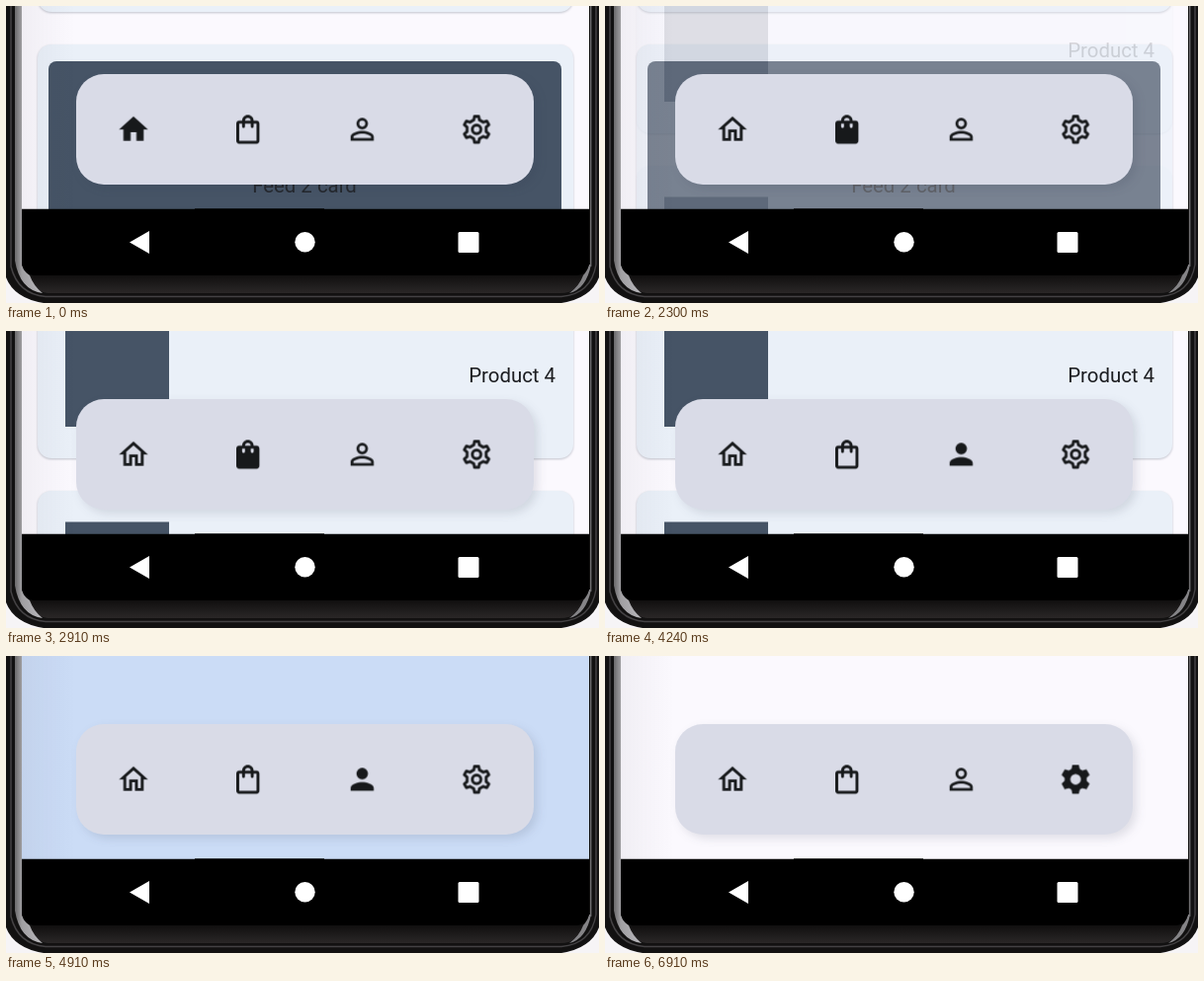
An HTML page for the animation above (7.58 s loop, 600 by 301 pixels).

```html
<!DOCTYPE html>
<html lang="en">
<head>
<meta charset="utf-8">
<title>Bottom navigation</title>
<style>
html, body { margin: 0; width: 100%; height: 100%; overflow: hidden; background: #f6f4f6; }
svg { display: block; width: 100%; height: 100%; }
text { font: 20.4px Roboto, Arial, sans-serif; }
.page, .icon path { animation: 7580ms linear infinite; }
.icon path { animation-timing-function: step-end; }
#feed { animation-name: feed; }
#shop { animation-name: shop; }
#me { animation-name: me; }
.paper { fill: #fbf9fe; }
.card { fill: #eaf0f8; filter: drop-shadow(0 1.5px 1px rgba(60, 70, 90, .3)); }
.tile { fill: #465466; }
.bar { fill: #d9dbe7; filter: drop-shadow(4px 4px 5px rgba(40, 45, 70, .13)); }
@keyframes feed {
  0%, 30.339% { opacity: 1; }
  30.34% { opacity: .84; animation-timing-function: steps(4, end); }
  31.92%, 100% { opacity: 0; }
}
@keyframes shop {
  0%, 30.339% { opacity: 0; }
  30.34% { opacity: .16; animation-timing-function: steps(4, end); }
  31.92% { opacity: 1; }
  55.93% { opacity: 1; animation-timing-function: steps(7, end); }
  58.7%, 100% { opacity: 0; }
}
@keyframes me {
  0% { opacity: 0; }
  55.93% { opacity: 0; animation-timing-function: steps(7, end); }
  58.7% { opacity: 1; }
  83.5% { opacity: 1; animation-timing-function: steps(3, end); }
  84.69%, 100% { opacity: 0; }
}
</style>
</head>
<body>
<svg viewBox="0 0 600 301" preserveAspectRatio="none">
  <defs>
    <linearGradient id="rim">
      <stop offset="0" stop-color="#6a696b"/>
      <stop offset=".25" stop-color="#a09fa2"/>
      <stop offset="1" stop-color="#b9b8bc"/>
    </linearGradient>
    <linearGradient id="chin" x2="0" y2="1">
      <stop offset="0" stop-color="#0c0b0b"/>
      <stop offset="1" stop-color="#2a2727"/>
    </linearGradient>
    <linearGradient id="shade">
      <stop offset="0" stop-color="#302838" stop-opacity=".05"/>
      <stop offset="1" stop-color="#302838" stop-opacity="0"/>
    </linearGradient>
    <clipPath id="screen"><path d="M16 0H590V206H16z"/></clipPath>
  </defs>

  <!-- phone body -->
  <path d="M0 0H600V275Q592 296 562 301H38Q8 296 0 275z" fill="#121111"/>
  <path d="M20 270H584Q582 291 560 291H42Q24 288 20 270z" fill="url(#chin)"/>
  <path d="M9 0H16V262Q18 269 24 273Q28 284 37 291Q14 288 9 258z" fill="url(#rim)"/>
  <path d="M590 262Q588 269 584 273Q580 284 570 291Q587 287 592 262z" fill="#858487"/>
  <path d="M591.7 0V264" stroke="#6f6e71" stroke-width="1.4"/>
  <path d="M597 0V262Q592 292 562 294.5H40Q12 292 5 264V0" fill="none" stroke="#444244" stroke-width="1.5"/>

  <g clip-path="url(#screen)">
    <path class="paper" d="M16 0H590V206H16z"/>
    <g class="page" id="feed">
      <rect class="card" x="32" y="-60" width="542" height="66" rx="14"/>
      <rect class="card" x="32" y="39" width="542" height="220" rx="14"/>
      <rect class="tile" x="43" y="56" width="519" height="190" rx="8"/>
      <text x="302" y="189" text-anchor="middle" fill="#24272c">Feed 2 card</text>
    </g>
    <g class="page" id="shop">
      <path class="paper" d="M16 0H590V206H16z"/>
      <rect class="card" x="32" y="-60" width="542" height="189" rx="14"/>
      <rect class="card" x="32" y="162" width="542" height="120" rx="14"/>
      <path class="tile" d="M60 0H165V97H60zM60 193.5H165V206H60z"/>
      <text x="556" y="52" text-anchor="end" fill="#1c1d20">Product 4</text>
    </g>
    <path class="page" id="me" d="M16 0H590V206H16z" fill="#cbdcf6"/>
    <path d="M16 0H70V206H16z" fill="url(#shade)"/>
    <rect class="bar" x="71" y="69" width="463" height="112" rx="28"/>
    <g id="icons" fill="#17191b"></g>
  </g>

  <!-- system buttons -->
  <path d="M16 205.8H191V205.2H322V205.8H590V262Q587 273 578 273H28Q19 273 16 262z"/>
  <g fill="#fff">
    <path d="M125 239.5L145 228V251z"/>
    <circle cx="302.5" cy="239.3" r="10.2"/>
    <rect x="457.5" y="229" width="21" height="21" rx="1.5"/>
  </g>
</svg>
<script>
const loop = 7580;
const switches = [0, 2300, 4240, 6300, loop];

// Closed six-tooth outline around (12, 12), given half widths and radii of a tooth.
function gear(tip, top, foot, base) {
  const tooth = [[-foot, -base], [-tip, -top], [tip, -top], [foot, -base]];
  const points = [];
  for (let k = 0; k < 6; k++) {
    const c = Math.cos(k * Math.PI / 3), s = Math.sin(k * Math.PI / 3);
    for (const [x, y] of tooth)
      points.push((12 + x * c - y * s).toFixed(2) + ' ' + (12 + x * s + y * c).toFixed(2));
  }
  return 'M' + points.join('L') + 'z';
}

const ring = r => `M${12 - r} 12a${r} ${r} 0 1 0 ${2 * r} 0a${r} ${r} 0 1 0 ${-2 * r} 0z`;

const bag = 'M18 6h-2c0-2.21-1.79-4-4-4S8 3.79 8 6H6c-1.1 0-2 .9-2 2v12c0 1.1.9 2 2 2h12c1.1 0 2-.9 2-2V8c0-1.1-.9-2-2-2z';
const handle = 'M12 4c1.1 0 2 .9 2 2h-4c0-1.1.9-2 2-2z';
const notch = x => `M${x} 8h2v2c0 .55-.45 1-1 1s-1-.45-1-1z`;

// Each icon: outlined, then filled.
const icons = [
  ['M12 5.69l5 4.5V18h-2v-6H9v6H7v-7.81l5-4.5M12 3L2 12h3v8h6v-6h2v6h6v-8h3z',
   'M10 20v-6h4v6h5v-8h3L12 3 2 12h3v8z'],
  [bag + handle + 'M18 20H6V8h2v2c0 .55.45 1 1 1s1-.45 1-1V8h4v2c0 .55.45 1 1 1s1-.45 1-1V8h2z',
   bag + handle + notch(8) + notch(14)],
  ['M12 5.9a2.1 2.1 0 1 1 0 4.2a2.1 2.1 0 1 1 0-4.2M12 14.9c2.97 0 6.1 1.46 6.1 2.1v1.1H5.9V17c0-.64 3.13-2.1 6.1-2.1M12 4a4 4 0 1 0 0 8a4 4 0 1 0 0-8zM12 13c-2.67 0-8 1.34-8 4v3h16v-3c0-2.66-5.33-4-8-4z',
   'M12 4a4 4 0 1 0 0 8a4 4 0 1 0 0-8zM12 14c-2.67 0-8 1.34-8 4v2h16v-2c0-2.66-5.33-4-8-4z'],
  [gear(1.45, 9, 1.95, 6.5) + ring(3),
   gear(2, 9.6, 2.6, 6.9) + ring(4)]
];
const strokes = ['fill="none" stroke="#17191b" stroke-width="2"', 'stroke="#17191b" stroke-width=".7"'];

const percent = t => (t / loop * 100 - .003).toFixed(3) + '%';
let css = '', svg = '';
icons.forEach((shapes, i) => {
  const start = i ? percent(switches[i]) : '0%';
  const end = i < 3 ? percent(switches[i + 1]) : '100%';
  const paths = shapes.map((d, on) => {
    const rest = i ? `0% { opacity: ${1 - on} }` : '';
    css += `@keyframes icon${i}${on} { ${rest} ${start} { opacity: ${on} } ${end} { opacity: ${1 - on} } 100% { opacity: ${1 - on} } }\n`;
    const line = i === 3 ? strokes[on] + ' stroke-linejoin="round"' : '';
    return `<path d="${d}" fill-rule="evenodd" ${line} style="animation-name:icon${i}${on}"/>`;
  });
  const x = 129 + i * 115.7;
  svg += `<g class="icon" transform="translate(${x} 125) scale(1.46) translate(-12 -12)">${paths.join('')}</g>`;
});
document.head.appendChild(document.createElement('style')).textContent = css;
document.getElementById('icons').innerHTML = svg;
</script>
</body>
</html>
```
